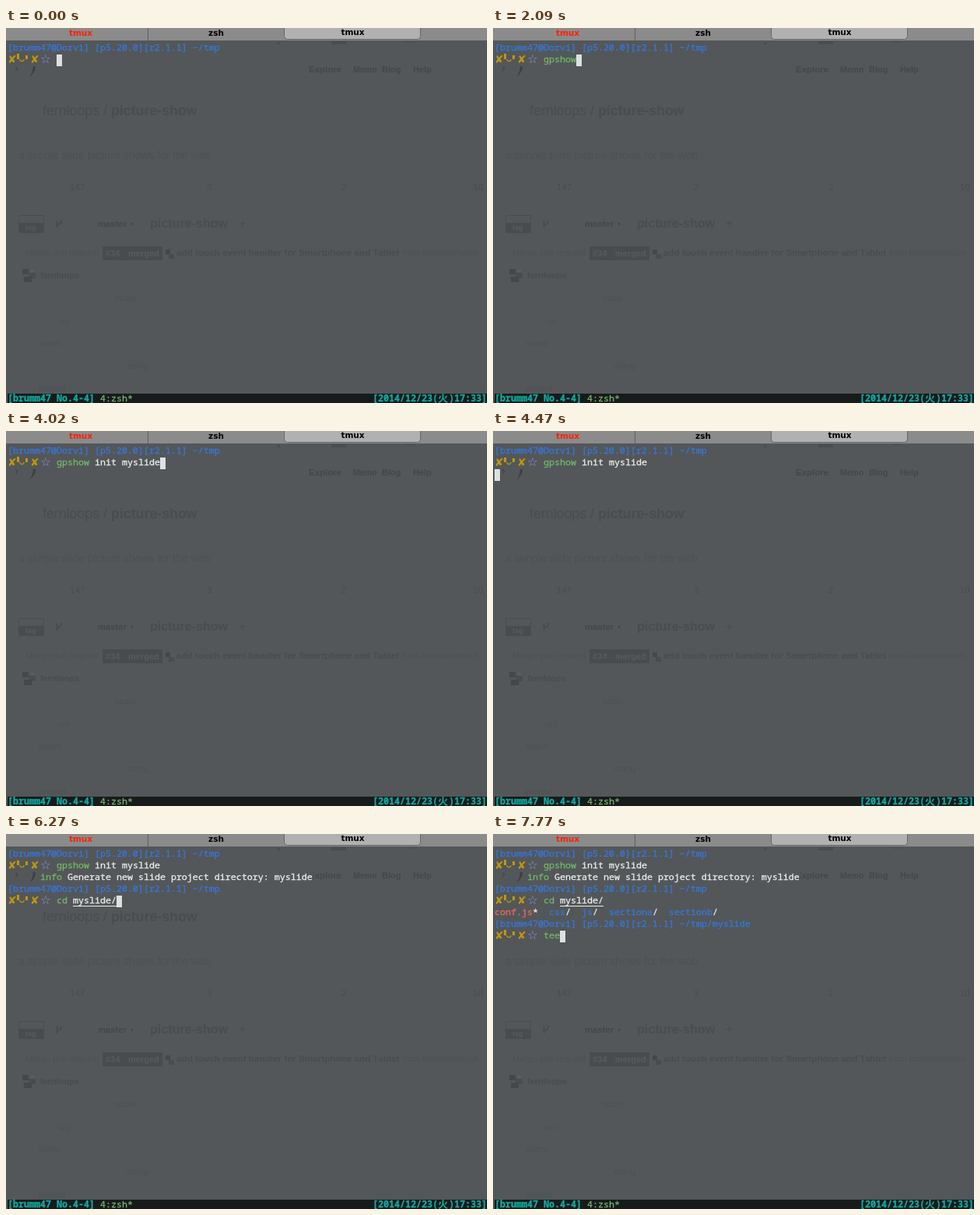
Animation of 618x481 px, one loop 8 s. Source, as an HTML page with a canvas:

```html
<!DOCTYPE html>
<html lang="en">
<head>
<meta charset="utf-8">
<title>Terminal session</title>
<style>
html, body { margin: 0; width: 100%; height: 100%; overflow: hidden; background: #535759; }
canvas { display: block; }
</style>
</head>
<body>
<canvas id="stage" width="618" height="481"></canvas>
<script>
const ctx = document.getElementById('stage').getContext('2d');
const LOOP = 8000, CELL = 7, LEFT = 2, TOP = 19, ROW = 15;
const MONO = '11.667px "Noto Sans Mono", "DejaVu Sans Mono", monospace';
const SANS = '"Liberation Sans", Arial, sans-serif';
const SYMBOL = '"DejaVu Sans", sans-serif';
const C = {
  bg: '#535759', white: '#eceeed', blue: '#3677dc', green: '#73b56c',
  yellow: '#c0960f', star: '#8d92ea', red: '#f5665c', teal: '#10aba2', cursor: '#dde1e0'
};
const HOST = '[brumm47@Dorvi] [p5.20.0][r2.1.1] ~/tmp';

// [time, characters typed so far]
const KEYS = {
  init: [[1200, 1], [1350, 2], [1800, 3], [1950, 5], [2090, 6], [2230, 7], [2380, 8], [2530, 10],
    [2680, 11], [2830, 12], [2970, 13], [3120, 14], [3570, 15], [3720, 16], [3870, 17], [4020, 19]],
  cd: [[5220, 1], [5370, 2], [5520, 3], [5670, 4], [5820, 5], [5970, 6], [6270, 11]],
  tee: [[7320, 1], [7620, 2], [7770, 3]]
};
const typed = (keys, t) => keys.reduce((n, [at, len]) => t >= at ? len : n, 0);

function rect(x, y, w, h, color) {
  ctx.fillStyle = color;
  ctx.fillRect(x, y, w, h);
}

function text(str, x, y, font, color, align = 'left') {
  ctx.font = font;
  ctx.fillStyle = color;
  ctx.textAlign = align;
  ctx.fillText(str, x, y);
}

// Terminal text with slightly thickened strokes
function mono(str, x, y, color, font = MONO) {
  text(str, x, y, font, color);
  ctx.strokeStyle = color;
  ctx.lineWidth = 0.3;
  ctx.lineJoin = 'round';
  ctx.strokeText(str, x, y);
}

// Written cells hide the page behind the window
function cells(col, row, count, color = C.bg) {
  rect(LEFT + col * CELL, TOP + row * ROW, count * CELL, ROW, color);
}

function put(str, col, row, color, underline) {
  const x = LEFT + col * CELL, y = TOP + row * ROW;
  cells(col, row, str.length);
  mono(str, x, y + 10, color);
  if (underline && str) rect(x, y + 13, str.length * CELL, 1, color);
}

const cursor = (col, row) => cells(col, row, 1, C.cursor);

function drawTabs() {
  rect(0, 0, 618, 16, '#8b8b8b');
  rect(182, 0, 1, 16, '#5f5f5f');
  ctx.beginPath();
  ctx.roundRect(357.5, -4, 175, 18.5, 4);
  ctx.fillStyle = '#b1b1b1';
  ctx.fill();
  ctx.strokeStyle = '#656565';
  ctx.lineWidth = 1;
  ctx.stroke();
  const font = 'bold 10.5px ' + SYMBOL;
  text('tmux', 96, 10, font, '#ff2100', 'center');
  text('zsh', 270, 10, font, '#000', 'center');
  text('tmux', 445.5, 9, font, '#000', 'center');
}

// Web page showing faintly through the terminal window
function drawPage() {
  const dark = '#44484a', mid = '#494d4f', faint = '#4d5153';
  const plain = (s, x, y, size, color) => text(s, x, y, size + 'px ' + SANS, color);
  const bold = (s, x, y, size, color) => text(s, x, y, 'bold ' + size + 'px ' + SANS, color);

  rect(418, 17, 19, 4, mid);
  rect(348, 18, 4, 3, mid);
  rect(513, 17, 12, 2, faint);

  bold('›', 11, 56, 15, dark);
  ctx.beginPath();
  ctx.moveTo(33, 42);
  ctx.quadraticCurveTo(44, 51, 30, 63);
  ctx.quadraticCurveTo(38, 52, 33, 42);
  ctx.fillStyle = '#3c4042';
  ctx.fill();

  bold('Explore', 389, 57, 11.5, dark);
  bold('Memo', 446, 57, 10.5, dark);
  bold('Blog', 483, 57, 11, dark);
  bold('Help', 523, 57, 11, dark);

  plain('fernloops /', 47, 112, 17.8, mid);
  bold('picture-show', 135, 112, 17.8, mid);
  plain('a simple slide picture shows for the web', 16, 168, 14, faint);
  plain('147', 82, 208, 11.5, mid);
  plain('3', 258, 208, 11.5, mid);
  plain('2', 431, 208, 11.5, mid);
  plain('10', 600, 208, 11.5, mid);

  ctx.strokeStyle = mid;
  ctx.lineWidth = 1;
  ctx.strokeRect(16.5, 240.5, 32, 22);
  rect(17, 250, 32, 12, '#484c4e');
  bold('tag', 25, 259, 9, '#575b5d');
  ctx.strokeStyle = dark;
  ctx.lineWidth = 1.3;
  ctx.beginPath();
  ctx.moveTo(65.5, 247);
  ctx.lineTo(65.5, 256);
  ctx.moveTo(71, 246);
  ctx.quadraticCurveTo(71, 252, 66, 252);
  ctx.stroke();
  bold('master', 118, 255, 11.3, dark);
  text('▾', 160, 254, '8px ' + SYMBOL, dark);
  bold('picture-show', 185, 256, 16.1, mid);
  plain('+', 299, 256, 16, mid);

  plain('Merge pull request', 25, 292, 11.4, faint);
  rect(124, 280, 77, 18, '#484c4e');
  bold('#34', 128, 293, 11, '#575b5d');
  bold('merged', 157, 293, 11, '#575b5d');
  rect(205, 284, 6, 6, dark);
  rect(209, 290, 7, 6, mid);
  bold('add touch event handler for Smartphone and Tablet', 219, 292, 11.7, mid);
  plain('from lomotavi/touch', 509, 292, 11.3, faint);

  rect(21, 309, 8, 7, dark);
  rect(29, 314, 9, 7, mid);
  rect(23, 319, 10, 7, dark);
  rect(32, 310, 4, 3, '#5a5e60');
  bold('fernloops', 44, 321, 11, mid);
  plain('scala', 140, 350, 11.5, faint);
  plain('src', 67, 380, 11.5, faint);
  plain('notes', 42, 408, 11.5, faint);
  plain('string', 155, 437, 11.5, faint);
  plain('project', 42, 466, 11.5, faint);
}

function drawStatus() {
  rect(2, 469, 616, 12, '#171b1c');
  const font = 'bold ' + MONO;
  mono('[brumm47 No.4-4]', 2, 479, C.teal, font);
  mono('4:zsh*', 121, 479, C.green);
  mono('[2014/12/23(', 471, 479, C.teal, font);
  text('火', 555, 479, 'bold 13px "Noto Sans CJK JP", "Noto Sans CJK", sans-serif', C.teal);
  mono(')17:33]', 569, 479, C.teal, font);
}

function prompt(row, dir = '', clipped = false) {
  put(HOST + dir, 0, row, C.blue);
  cells(0, row + 1, 9);
  const y = TOP + (row + 1) * ROW;
  text('✘', 2, y + 11, '14px ' + SYMBOL, C.yellow);
  text('✘', 31, y + 11, '14px ' + SYMBOL, C.yellow);
  const top = clipped ? 0 : -1;
  rect(14, y + top, 3, 6 - top, C.yellow);
  rect(25, y + 1, 3, 5, C.yellow);
  ctx.beginPath();
  ctx.arc(20.5, y + 6, 2.6, 0, Math.PI);
  ctx.strokeStyle = C.yellow;
  ctx.lineWidth = 1.1;
  ctx.stroke();
  text('☆', 44, y + 11, '15.5px ' + SYMBOL, C.star);
}

function initLine(n) {
  const cmd = 'gpshow'.slice(0, n), arg = 'myslide'.slice(0, Math.max(0, n - 12));
  const guess = arg.length < 3;
  put(cmd, 9, 1, n < 6 ? C.red : C.green);
  put('init'.slice(0, Math.max(0, n - 7)), 16, 1, C.white);
  put(arg, 21, 1, guess ? C.yellow : C.white, guess);
}

function cdLine(n) {
  put('cd'.slice(0, n), 9, 4, n < 2 ? C.white : C.green, n < 2);
  put('myslide/'.slice(0, Math.max(0, n - 3)), 12, 4, C.white, true);
}

function listing() {
  cells(0, 5, 41);
  put('conf.js', 0, 5, C.red);
  put('*', 7, 5, C.white);
  for (const [name, col] of [['css', 10], ['js', 16], ['sectiona', 21], ['sectionb', 32]]) {
    put(name, col, 5, C.blue);
    put('/', col + name.length, 5, C.white);
  }
}

function drawShell(t) {
  const a = typed(KEYS.init, t), b = typed(KEYS.cd, t), c = typed(KEYS.tee, t);
  prompt(0, '', t >= 4470 && t < 7320);
  initLine(a);
  if (t < 4470) {
    if (t < 900 || t >= 1200) cursor(9 + a, 1);
    return;
  }
  if (t < 4620) {
    cursor(0, 2);
    return;
  }
  put('info ', 6, 2, C.green);
  put('Generate new slide project directory: myslide', 11, 2, C.white);
  prompt(3);
  cdLine(b);
  if (t < 6870) {
    cursor(9 + b, 4);
    return;
  }
  listing();
  if (t < 7020) {
    cursor(0, 6);
    return;
  }
  prompt(6, '/myslide');
  put('tee'.slice(0, c), 9, 7, c < 3 ? C.red : C.green);
  cursor(9 + c, 7);
}

const start = performance.now();
function frame() {
  const t = (performance.now() - start) % LOOP;
  rect(0, 0, 618, 481, C.bg);
  drawPage();
  drawTabs();
  drawStatus();
  drawShell(t);
  requestAnimationFrame(frame);
}
frame();
</script>
</body>
</html>
```
